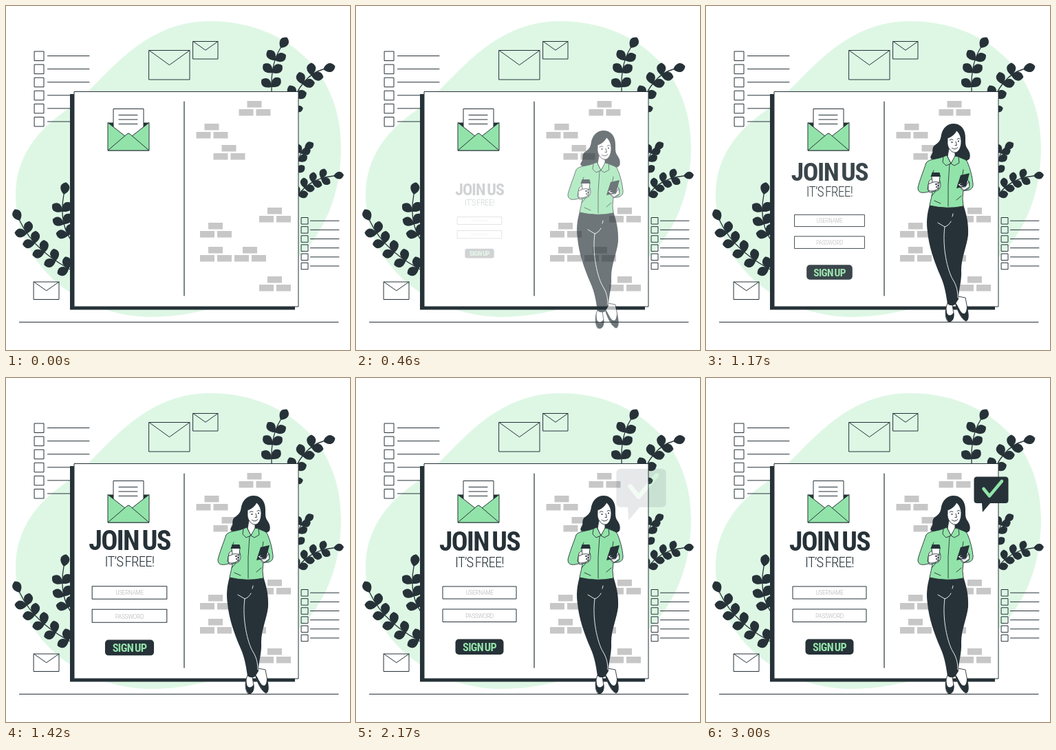
Write an HTML page that moves like this. It is 500 by 500 pixels and loops after 3.04 s.

```html
<!DOCTYPE html>
<html lang="en">
<head>
<meta charset="utf-8">
<title>Join us</title>
<style>
  html, body { margin: 0; width: 100%; height: 100%; overflow: hidden; background: #fff; }
  svg { display: block; width: 100%; height: 100%; }
  .line { fill: none; stroke: #263238; stroke-linecap: round; stroke-linejoin: round; }
  .dark { fill: #263238; }
  .white { fill: #fff; stroke: #263238; stroke-linejoin: round; }
  .green { fill: #92e3a9; stroke: #263238; stroke-linejoin: round; }
  text {
    font: 300 20px "Roboto Condensed", "Open Sans Condensed", Roboto, sans-serif;
    font-stretch: 75%; letter-spacing: -.04em; word-spacing: -.08em;
    text-anchor: middle; fill: #263238;
  }
  .bold { font-weight: 700; }
  .hint { fill: #b4b4b4; }
</style>
</head>
<body>
<svg viewBox="0 0 500 500">
  <path fill="#def7e5" d="M297 22C400 22 487 90 487 205C487 275 462 330 425 365C370 418 300 452 208 452C110 450 14 380 14 275C14 220 45 180 90 150C140 115 190 22 297 22Z"/>
  <g id="plants" class="dark"></g>
  <path id="outlines" class="line"/>

  <!-- panel -->
  <path class="dark" d="M93 128H420V441.5H93Z"/>
  <path class="white" d="M99 124.5H425V437H99Z"/>
  <path class="line" stroke-width="1.2" d="M259 139V421M19.500 459.500H483"/>
  <path id="bricks" fill="#c7c7c7"/>

  <!-- open letter -->
  <path class="dark" d="M148 169.500H208V210H148Z"/>
  <path class="white" d="M156 149.500H200V200H156Z"/>
  <path class="line" d="M164 158.500H191M164 165H191M164 171.500H191"/>
  <path class="green" d="M148 169.500L178 193L208 169.500V210H148Z"/>
  <path class="green" d="M148 210L176 186Q178 184 180 186L208 210Z"/>

  <g id="form">
    <text class="bold" x="179.500" y="237" data-width="117">JOIN US</text>
    <text x="179.500" y="267.500" data-width="71">IT’S FREE!</text>
    <path class="white" d="M126 303H233V321H126ZM126 336H233V354.500H126Z"/>
    <text class="hint" x="179.500" y="312" data-width="40">USERNAME</text>
    <text class="hint" x="179.500" y="345.500" data-width="41">PASSWORD</text>
    <rect class="dark" x="144.500" y="379.500" width="70" height="22.500" rx="5"/>
    <text class="bold" style="fill:#92e3a9" x="179.500" y="391" data-width="49">SIGN UP</text>
  </g>

  <g id="woman" stroke-width=".9">
    <!-- hair, face -->
    <path class="dark" d="M360 171C350 171 344 178 342 187C341 195 339 198 333 202C327 206 331 212 328 216C325 220 326 223 331 223C338 225 346 224 353 226L368 224C374 228 380 225 383 222C385 217 383 211 379 206C375 199 379 190 375 181C372 174 366 171 360 171Z"/>
    <path class="white" d="M353 207L351 219L356 229L362 220V210Z"/>
    <path class="white" d="M351 192C357 190 362 186 364 181C368 184 371 190 371 197C371 206 367 213 362 213C356 213 350 205 351 197Z"/>
    <path class="line" d="M354 195Q357 192.500 359 194.500M365 193.500Q367 191.500 369 193M363 197L364.500 202.500H362M357.500 206.500Q362 210 366 205.500"/>
    <circle class="dark" cx="357.500" cy="198" r="1.100"/>
    <circle class="dark" cx="367" cy="196.500" r="1.100"/>
    <!-- legs, shoes -->
    <path class="white" d="M352 430C347 440 347 452 351 458C356 460 361 455 360 447C359 440 358 436 358 428Z"/>
    <path class="dark" d="M349 436C347 448 349 459 355 459C360 458 361 451 360 445C357 451 351 451 350 445Z"/>
    <path class="white" d="M362 430C364 440 371 456 378 458C383 456 381 446 380 440L377 424L366 422Z"/>
    <path class="dark" d="M362 431C366 445 374 458 379 458C383 455 381 443 379 436C379 446 376 449 372 446C368 442 366 434 362 431Z"/>
    <path class="dark" d="M325 289C321 303 320 315 322 328C324 349 331 370 341 393C347 406 349 420 351 433Q356 437 362 434L367 426C367 412 372 400 371 384C371 366 379 350 381 333C382 315 378 301 374 289Z"/>
    <path class="line" style="stroke:#fff" d="M337 315L347 321Q353 319 356 313M358 306Q359 304 359 302M347 321C343 350 351 385 359 398C364 406 366 414 366 424"/>
    <!-- shirt -->
    <path class="green" d="M345 219C336 223 324 222 320 228C316 240 310 255 308 264C308 273 316 273 329 268C329 276 326 283 325 290Q350 296 374 291Q372 280 374 268C383 269 389 266 388 258C387 248 384 236 380 227C378 222 371 222 367 219L356 228Z"/>
    <path class="green" d="M350 217L345 219L344 227L349 232L356 229ZM362 218L367 219L368 228L361 232L356 229Z"/>
    <path class="line" d="M354 230Q351 260 352 291M331 239L327 248M328 276L335 268M374 238Q373 249 369 256M371 276L364 282M332 283L341 287"/>
    <!-- cup -->
    <path class="white" d="M322 266L324 255Q328 249 331 253L340 254Q343 264 337 268L325 271Z"/>
    <path class="white" d="M328 247H340L338 266H330Z"/>
    <path class="dark" d="M328.500 242H339.500L341 248H327Z"/>
    <path class="white" d="M323 259L330 256Q337 255 339 257L333 259L339 261L334 263L338 265Q330 271 323 268Z"/>
    <!-- phone -->
    <path class="white" d="M366 260L370 252H380L383 257L382 265L374 269Z"/>
    <path class="dark" d="M370 246L383 243L378 262L364 265Z"/>
    <path class="white" d="M366 259L373 257L369 260L375 261L370 263L377 263L382 255L383 263L375 268Z"/>
  </g>

  <g id="bubble">
    <path class="dark" d="M394 143.500H435Q439.500 143.500 439.500 148V177.500Q439.500 182 435 182H413L402 195L401 182H394Q389.500 182 389.500 177.500V148Q389.500 143.500 394 143.500Z"/>
    <path fill="none" stroke="#92e3a9" stroke-width="4.500" stroke-linecap="round" stroke-linejoin="round" d="M403.500 161L412 171.500L430 150"/>
  </g>
</svg>
<script>
const $ = id => document.getElementById(id);
const LOOP = 3040;

// Stems are quadratic curves; leaves sit in pairs along them, one more at the tip.
const leaf = (x, y, angle, size) =>
  `<path transform="translate(${x} ${y}) rotate(${angle}) scale(${size})"
    d="M0 0C.15-.2 .35-.38 .62-.36C.82-.33 .94-.15 1 0C.94.15 .82.33 .62.36C.35.38 .15.2 0 0Z"/>`;

function plant(x0, y0, x1, y1, x2, y2, pairs, size) {
  const at = (a, b, c, t) => (1 - t) ** 2 * a + 2 * t * (1 - t) * b + t * t * c;
  const slope = (a, b, c, t) => (1 - t) * (b - a) + t * (c - b);
  const heading = t => Math.atan2(slope(y0, y1, y2, t), slope(x0, x1, x2, t)) * 180 / Math.PI;
  let out = `<path class="line" stroke-width="1.3" d="M${x0} ${y0}Q${x1} ${y1} ${x2} ${y2}"/>`;
  out += leaf(x2, y2, heading(1), size);
  for (let i = 0; i < pairs; i++) {
    const t = (i + .8) / (pairs + 1);
    for (const side of [-52, 46])
      out += leaf(at(x0, x1, x2, t), at(y0, y1, y2, t), heading(t) + side, size);
  }
  return out;
}

$('plants').innerHTML = [
  [387, 136, 382, 88, 399, 61, 3, 18],
  [412, 150, 430, 100, 461, 92, 3, 18],
  [420, 258, 424, 213, 434, 207, 3, 15],
  [418, 285, 436, 251, 476, 247, 4, 15],
  [98, 345, 76, 318, 84, 274, 3, 18],
  [108, 390, 42, 360, 20, 312, 5, 18]
].map(p => plant(...p)).join('') + leaf(419, 151, -12, 13);

// Checklists and outlined envelopes
const box = (x, y, w, h) => `M${x} ${y}h${w}v${h}h${-w}Z`;
const envelope = (x, y, w, h) => box(x, y, w, h) + `l${w / 2} ${h / 2}l${w / 2} ${-h / 2}`;
let outlines = envelope(208, 64.5, 59, 42.5) + envelope(272, 51.5, 36, 25.5) + envelope(40.5, 401, 36.5, 25.5);
for (let i = 0; i < 6; i++) {
  const left = 66 + i * 19.1, right = 307.5 + i * 13.15;
  outlines += box(41.5, left, 13.5, 13.5) + `M60.500 ${left + 6.5}H121`;
  outlines += box(429.5, right, 9.5, 9.5) + `M442.500 ${right + 4.7}H484`;
}
$('outlines').setAttribute('d', outlines);

$('bricks').setAttribute('d', [
  [350.5, 138], [288.5, 171], [313.5, 202], [380, 293], [294, 315], [294, 350], [344, 350], [380, 393]
].map(([x, y]) => box(x, y, 21, 9.5) + box(x - 12, y + 12, 21, 9.5) + box(x + 13, y + 12, 21, 9.5)).join(''));

// Choose the font size that gives each label its width; y is the middle of the capitals.
for (const label of document.querySelectorAll('text')) {
  label.style.fontSize = 20 * label.dataset.width / label.getComputedTextLength() + 'px';
  label.setAttribute('dy', '.356em');
}

// cubic-bezier(.36, -.01, .5, 1.38)
function ease(x) {
  if (x <= 0) return 0;
  if (x >= 1) return 1;
  const curve = (a, b, s) => 3 * (1 - s) ** 2 * s * a + 3 * (1 - s) * s * s * b + s ** 3;
  let low = 0, high = 1;
  for (let i = 0; i < 24; i++) {
    const mid = (low + high) / 2;
    if (curve(.36, .5, mid) < x) low = mid; else high = mid;
  }
  return curve(-.01, 1.38, low);
}

function pose(id, opacity, transform) {
  $(id).setAttribute('opacity', Math.min(1, Math.max(0, opacity)));
  $(id).setAttribute('transform', transform);
}
const zoom = (x, y, k) => `translate(${x} ${y}) scale(${k}) translate(${-x} ${-y})`;

function draw() {
  const t = performance.now() % LOOP;
  const rise = t < 170 ? 0 : ease(t / 1000);
  const grow = t < 170 ? 0 : ease((t + 20) / 2000);
  const shrink = t < 2170 ? 0 : ease((t - 2000) / 1000);
  pose('woman', rise, `translate(0 ${30 * (1 - rise)})`);
  pose('form', grow, zoom(179.5, 312, .5 + grow / 2));
  pose('bubble', shrink, zoom(414.5, 169, 1.5 - shrink / 2));
  requestAnimationFrame(draw);
}
draw();
</script>
</body>
</html>
```
